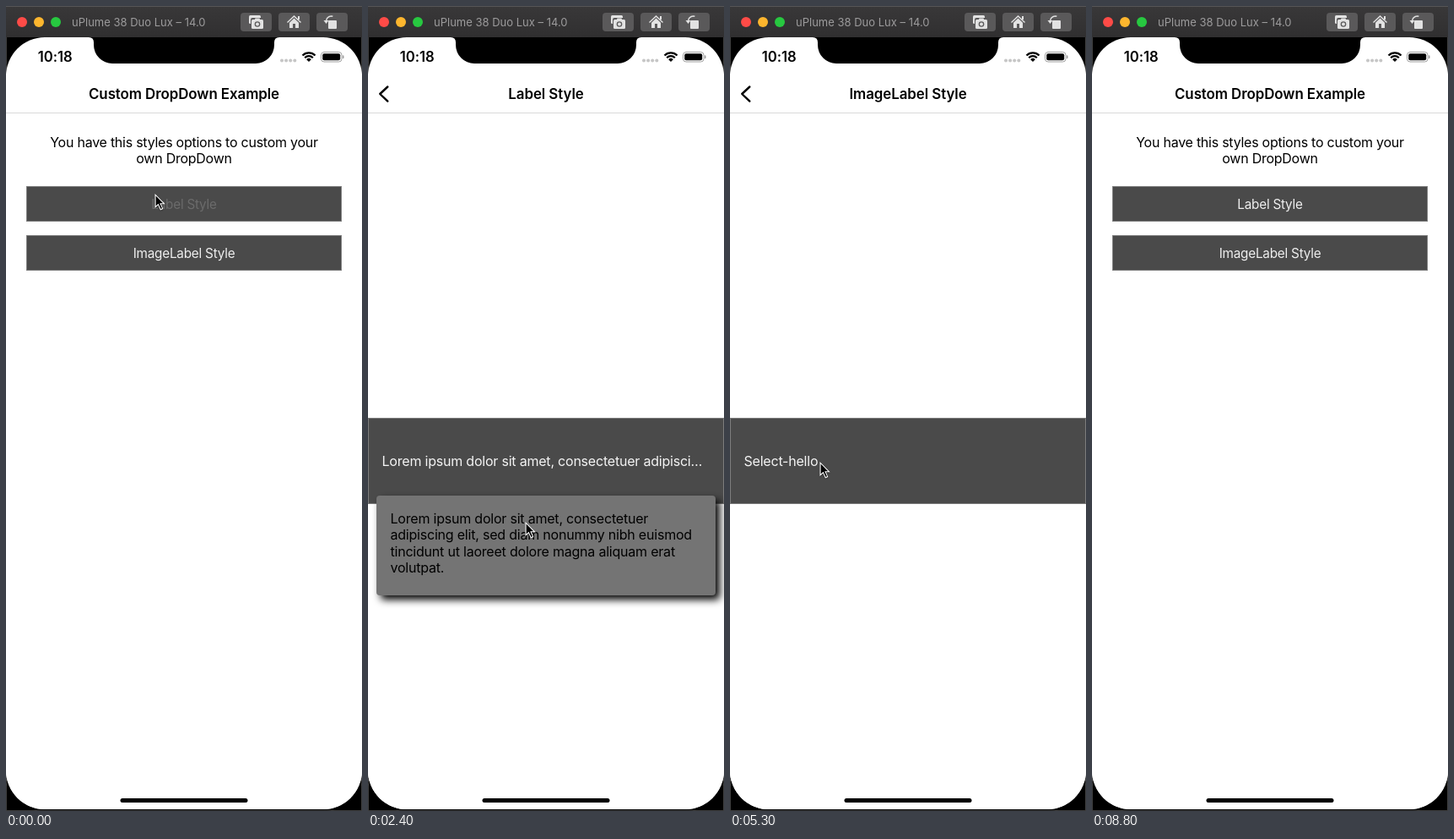
An HTML page with a canvas for the animation above (9400 ms loop, 422 px wide and 952 px high).

```html
<!DOCTYPE html>
<html lang="en">
<head>
<meta charset="utf-8">
<title>Dropdown demo</title>
<style>
html, body { margin: 0; width: 100%; height: 100%; overflow: hidden; background: #000; }
canvas { display: block; width: 422px; height: 952px; }
</style>
</head>
<body>
<canvas id="stage"></canvas>
<script>
const W = 422, H = 952, LOOP = 9400, STEP = 100, HEADER = 127;
const canvas = document.getElementById('stage');
const ctx = canvas.getContext('2d');
const ratio = window.devicePixelRatio || 1;
canvas.width = W * ratio;
canvas.height = H * ratio;

const GRAY = '#4a4a4a';
const LOREM = [
  'Lorem ipsum dolor sit amet, consectetuer',
  'adipiscing elit, sed diam nonummy nibh euismod',
  'tincidunt ut laoreet dolore magna aliquam erat',
  'volutpat.'
];
const HOME_TITLE = 'Custom DropDown Example';
const BODY = { size: 16, spacing: -0.21 };
const BUTTON = { size: 15.3, spacing: -0.23, align: 'center', color: '#efefef' };
const TITLE = { size: 16.9, spacing: -0.07, weight: 600, align: 'center' };

const visits = [
  { name: 'Label Style', press: 0, back: 3900, open: 1450, close: 2360, pick: 'Lorem ipsum dolor sit amet, consectetuer adipisci…' },
  { name: 'ImageLabel Style', press: 4800, back: 7500, open: 5450, close: 6360, pick: 'Go home' }
];

// Pointer stops: time, x, y
const pointer = [
  [0, 177, 223], [400, 177, 223], [1000, 150, 441], [1300, 144, 502], [1500, 144, 502],
  [2100, 187, 611], [2600, 187, 611], [3300, 27, 106], [3900, 27, 106], [4300, 99, 243],
  [4600, 108, 284], [4900, 108, 284], [5300, 107, 540], [5500, 107, 540], [5800, 100, 712],
  [6500, 100, 712], [7100, 10, 120], [7300, 18, 116], [7600, 18, 116], [8400, 134, 244],
  [8700, 407, 104]
];

const clamp = (v, lo = 0, hi = 1) => Math.min(hi, Math.max(lo, v));
const mix = (a, b, k) => a + (b - a) * k;

// Critically damped spring used by screen transitions; it snaps once at rest
function slide(ms) {
  if (ms <= 0) return 0;
  const x = ms * Math.sqrt(1000 / 3) / 1000;
  const p = 1 - Math.exp(-x) * (1 + x);
  return p > 0.997 ? 1 : p;
}

function menuHeight(t, visit) {
  if (t < visit.open) return 0;
  const s = (t - visit.open) / 1000;
  const grown = 166 * (1 - Math.exp(-10 * s) * Math.cos(16 * s));
  return grown * (1 - clamp((t - visit.close) / 138));
}

function text(str, x, y, { size, spacing = 0, weight = 400, align = 'left', color = '#000', alpha = 1 }) {
  ctx.save();
  ctx.globalAlpha *= alpha;
  ctx.font = `${weight} ${size}px Inter, "Liberation Sans", sans-serif`;
  ctx.letterSpacing = spacing + 'px';
  ctx.textAlign = align;
  ctx.fillStyle = color;
  ctx.fillText(str, x, y);
  ctx.restore();
}

function rect(x, y, w, h, color, radius = 0) {
  ctx.fillStyle = color;
  ctx.beginPath();
  ctx.roundRect(x, y, w, h, radius);
  ctx.fill();
}

function borderedBox(x, y, w, h) {
  rect(x, y, w, h, GRAY);
  ctx.strokeStyle = '#7c7c7c';
  ctx.lineWidth = 1;
  ctx.strokeRect(x + 0.5, y + 0.5, w - 1, h - 1);
}

function disc(x, y, r, color) {
  ctx.fillStyle = color;
  ctx.beginPath();
  ctx.arc(x, y, r, 0, Math.PI * 2);
  ctx.fill();
}

function poly(points, fill) {
  ctx.fillStyle = fill;
  ctx.beginPath();
  points.forEach(([x, y]) => ctx.lineTo(x, y));
  ctx.closePath();
  ctx.fill();
}

function line(points, color, width) {
  ctx.strokeStyle = color;
  ctx.lineWidth = width;
  ctx.beginPath();
  points.forEach(([x, y]) => ctx.lineTo(x, y));
  ctx.stroke();
}

function drawToolbar() {
  const shade = ctx.createLinearGradient(0, 0, 0, 37);
  shade.addColorStop(0, '#393839');
  shade.addColorStop(1, '#302f30');
  rect(0, 0, W, 37, shade);
  rect(0, 0, W, 1, '#565556');
  ['#fe4b47', '#fdb62e', '#27c840'].forEach((c, i) => disc(19 + 20 * i, 19, 6, c));
  text('uPlume 38 Duo Lux – 14.0', 78, 24, { size: 13, color: '#9c9b9c' });
  const tile = '#5a595a', ink = '#e2e2e2';
  [278, 323, 368].forEach(x => rect(x, 8, 37, 22, tile, 4));

  rect(288, 11, 14, 10, ink, 1.5);
  rect(290, 14, 17, 14, tile, 2);
  rect(291, 16, 14, 11, ink, 1.5);
  rect(295, 14.5, 6, 3, ink, 1);
  disc(298, 21.5, 3.3, tile);
  disc(298, 21.5, 2, ink);

  line([[333.5, 19.5], [341.5, 12], [349.5, 19.5]], ink, 1.4);
  rect(346, 12, 2, 4, ink);
  poly([[341.5, 14.5], [347, 19.7], [347, 26], [336, 26], [336, 19.7]], ink);
  rect(340, 21, 3, 5, tile);

  rect(382, 17, 10, 10, ink, 1);
  ctx.strokeStyle = ink;
  ctx.lineWidth = 1.5;
  ctx.beginPath();
  ctx.arc(385.5, 18, 6, Math.PI, Math.PI * 1.6);
  ctx.stroke();
  poly([[376.5, 17], [382.5, 17], [379.5, 21]], ink);
}

function drawStatus() {
  ctx.fillStyle = '#000';
  ctx.beginPath();
  ctx.moveTo(98, 37);
  ctx.quadraticCurveTo(104, 37, 104, 43);
  ctx.lineTo(104, 46);
  ctx.arcTo(104, 68, 126, 68, 22);
  ctx.lineTo(296, 68);
  ctx.arcTo(318, 68, 318, 46, 22);
  ctx.lineTo(318, 43);
  ctx.quadraticCurveTo(318, 37, 324, 37);
  ctx.fill();

  text('10:18', 58.3, 66, { size: 16.7, spacing: -0.05, weight: 600, align: 'center' });
  for (let i = 0; i < 4; i++) disc(327 + 5.1 * i, 64.5, 2, '#c6c6c6');

  const from = -Math.PI * 0.75, to = -Math.PI * 0.25;
  ctx.strokeStyle = '#000';
  ctx.lineWidth = 2.3;
  for (const r of [10.6, 6.8]) {
    ctx.beginPath();
    ctx.arc(359, 66, r, from, to);
    ctx.stroke();
  }
  ctx.fillStyle = '#000';
  ctx.beginPath();
  ctx.moveTo(359, 66);
  ctx.arc(359, 66, 4, from, to);
  ctx.fill();

  ctx.strokeStyle = '#a0a0a0';
  ctx.lineWidth = 1;
  ctx.beginPath();
  ctx.roundRect(373.5, 54.5, 24.5, 11.5, 3.5);
  ctx.stroke();
  rect(375.2, 56.2, 21, 8.1, '#000', 2);
  rect(399, 58.3, 1.5, 4, '#a0a0a0', 1);
}

function drawHeader(visit, p, t) {
  rect(0, 80, W, HEADER - 80, '#fff');
  rect(0, 126, W, 1, '#d9d9d9');
  const homeAlpha = clamp(1 - 2 * p);
  const nameAlpha = p < 0.5 ? 0 : p < 0.75 ? (p - 0.5) * 0.4 : mix(0.1, 1, (p - 0.75) * 4);
  text(HOME_TITLE, W / 2 - 71 * p, 110, { ...TITLE, alpha: homeAlpha });
  text(visit.name, W / 2 + W / 4 * (1 - p), 110, { ...TITLE, alpha: nameAlpha });
  ctx.save();
  ctx.globalAlpha = clamp((p - 0.3) / 0.7) * (t >= visit.back ? 0.25 : 1);
  ctx.lineCap = ctx.lineJoin = 'round';
  line([[23.3, 95.5], [14.2, 104], [23.3, 112.6]], '#000', 2.4);
  ctx.restore();
}

function drawHome(p, t) {
  ctx.save();
  ctx.translate(Math.round(-0.3 * W * p), 0);
  rect(0, HEADER, W, H - HEADER, '#fff');
  const intro = { ...BODY, spacing: -0.25, align: 'center' };
  text('You have this styles options to custom your', W / 2, 167, intro);
  text('own DropDown', W / 2, 186, intro);
  visits.forEach(({ name, press }, i) => {
    const y = 213 + 58 * i;
    const held = t >= press && t < press + 400;
    borderedBox(24, y, 374, 42);
    text(name, W / 2, y + 26.5, { ...BUTTON, alpha: held ? mix(0.2, 1, clamp((t - press - 50) / 250)) : 1 });
  });
  rect(0, HEADER, W, H - HEADER, `rgba(0,0,0,${0.07 * p})`);
  ctx.restore();
}

function drawMenu(h) {
  if (h < 1) return;
  ctx.save();
  ctx.shadowColor = '#000';
  ctx.shadowBlur = 10 * ratio;
  ctx.shadowOffsetX = ctx.shadowOffsetY = 5 * ratio;
  rect(10, 579, 402, h, '#747474', 4);
  ctx.restore();
  ctx.save();
  ctx.beginPath();
  ctx.rect(10, 579, 402, h);
  ctx.clip();
  LOREM.forEach((row, i) => text(row, 26.5, 612 + 19.4 * i, BODY));
  text('Go home', 26.5, 724, BODY);
  ctx.restore();
}

function drawDetail(visit, p, t) {
  if (p < 0.001) return;
  ctx.save();
  ctx.translate(Math.round(W * (1 - p)), 0);
  ctx.shadowColor = `rgba(0,0,0,${0.3 * p * (1 - p)})`;
  ctx.shadowBlur = 10 * ratio;
  rect(0, HEADER, W, H - HEADER, '#fff');
  ctx.shadowColor = 'transparent';
  borderedBox(0, 487, W, 102);
  text(t >= visit.close ? visit.pick : 'Select-hello', 16.5, 544, { ...BODY, color: '#f4f4f4' });
  drawMenu(menuHeight(t, visit));
  ctx.restore();
}

function drawPointer(t) {
  if (t >= 8800) return;
  const next = pointer.findIndex(k => k[0] > t);
  const b = pointer[next < 0 ? pointer.length - 1 : next];
  const a = next < 0 ? b : pointer[next - 1];
  const k = a === b ? 1 : (t - a[0]) / (b[0] - a[0]);
  const ease = k * k * (3 - 2 * k);
  ctx.save();
  ctx.translate(mix(a[1], b[1], ease), mix(a[2], b[2], ease));
  ctx.shadowColor = 'rgba(0,0,0,0.35)';
  ctx.shadowBlur = 2 * ratio;
  ctx.shadowOffsetY = ratio;
  poly([[-0.5, -1], [-0.5, 16], [3.3, 12.6], [6, 18.5], [9.3, 17], [6.8, 11.3], [11.7, 11.3]], '#fff');
  ctx.shadowColor = 'transparent';
  poly([[0.6, 1.5], [0.6, 13.4], [3.6, 10.7], [6.5, 17], [8, 16.3], [5.2, 10.2], [9.2, 10.2]], '#000');
  ctx.restore();
}

function draw(t) {
  const visit = visits[t < 4800 ? 0 : 1];
  const p = t < visit.back ? slide(t - visit.press - 30) : 1 - slide(t - visit.back - 30);
  ctx.setTransform(ratio, 0, 0, ratio, 0, 0);
  rect(0, 0, W, H, '#000');
  ctx.strokeStyle = '#3c3c3c';
  ctx.lineWidth = 1;
  ctx.strokeRect(0.5, 0.5, W - 1, H - 1);
  drawToolbar();

  ctx.save();
  ctx.beginPath();
  ctx.roundRect(0, 37, W, 913, 46);
  ctx.fillStyle = '#fff';
  ctx.fill();
  ctx.clip();
  drawHome(p, t);
  drawDetail(visit, p, t);
  drawHeader(visit, p, t);
  drawStatus();
  rect(135.5, 937, 151, 5, '#000', 2.5);
  ctx.restore();
  drawPointer(t);
}

// The picture updates ten times a second
const start = performance.now();
function tick() {
  const t = (performance.now() - start) % LOOP;
  draw(Math.floor(t / STEP) * STEP);
  requestAnimationFrame(tick);
}
tick();
</script>
</body>
</html>
```
